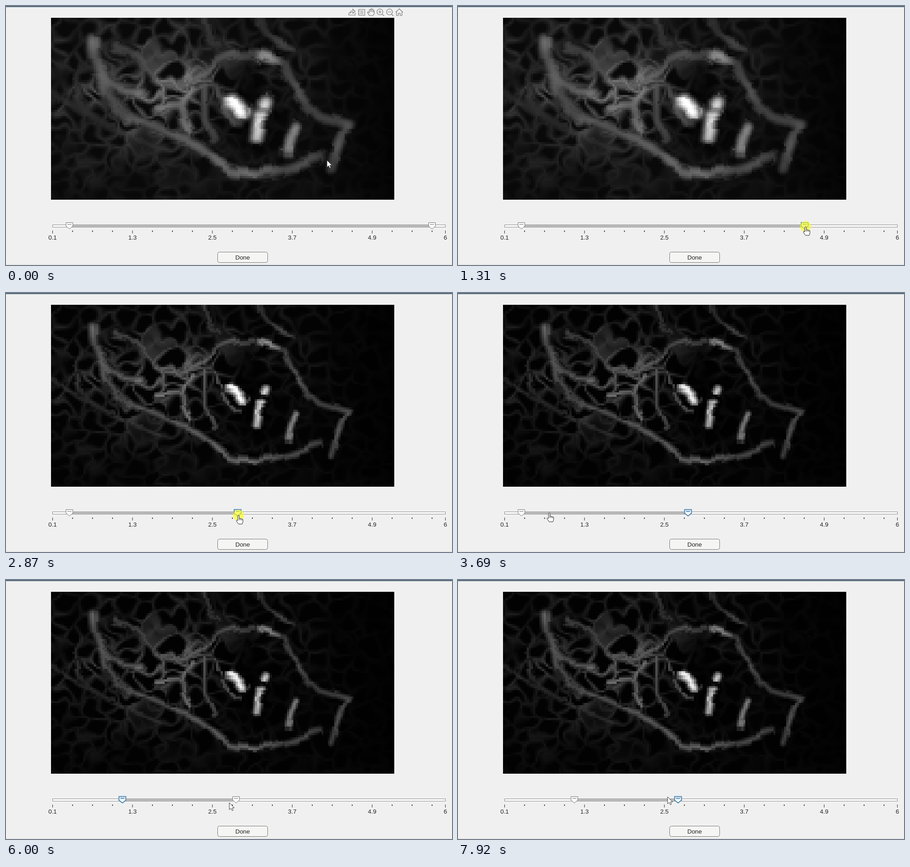
Recreate the animation shown at these times as an HTML page with a canvas. Size 981 by 571 pixels, loop 7990 ms.

```html
<!DOCTYPE html>
<html lang="en">
<head>
<meta charset="utf-8">
<style>
  html, body { margin: 0; width: 100%; height: 100%; overflow: hidden; background: #f0f0f0; }
  canvas { position: absolute; left: 99px; top: 26px; width: 755px; height: 401px; image-rendering: pixelated; }
  svg { position: absolute; left: 0; top: 0; width: 981px; height: 571px; }
  text { font: 13.4px "Liberation Sans", Arial, sans-serif; fill: #222; text-anchor: middle; }
</style>
</head>
<body>
<canvas id="view" width="160" height="85"></canvas>
<svg viewBox="0 0 981 571">
  <rect width="981" height="2.4" fill="#4e6579"/>
  <path d="M0 570.5H981" stroke="#dcdcdc"/>
  <g id="toolbar" fill="none" stroke="#777" stroke-width="1.2">
    <path d="M754 15v5h14v-5M756 16q1-6 7-6v-3l5 5-5 4v-3q-4 0-7 3"/>
    <path d="M776 7.5h13v13h-13zM779 11h7M779 14h7M779 17h7M774 11h3M774 17h3"/>
    <path d="M799 21l-4-7q2-2 4 1v-6q2-2 3 0v4-6q2-2 3 0v6-5q2-2 3 0v6-3q2-2 2 1v5l-3 4z"/>
    <path d="M827 18l5 4M819 13h7M822.5 9.500v7M848 18l4 4M840 13h7"/>
    <circle cx="822.5" cy="13" r="6.5"/><circle cx="843.5" cy="13" r="6.5"/>
    <path d="M857 14l8-8 8 8M859 13v8h4v-5h4v5h4v-8"/>
  </g>
  <rect x="102.5" y="482.5" width="864" height="5" fill="#fff" stroke="#888"/>
  <rect id="range" y="482.5" height="5" fill="#bfbfbf" stroke="#888"/>
  <g id="scale" stroke="#222"></g>
  <g id="labels"></g>
  <rect x="465.5" y="542.5" width="110" height="23" rx="4" fill="#f5f5f3" stroke="#777"/>
  <text x="520.5" y="558.5">Done</text>
  <g id="low"></g>
  <g id="high"></g>
  <circle id="press" r="12" fill="#ffff10" opacity=".62"/>
  <path id="arrow" d="M0 0V15.500L3.600 12.200 6 17.500 8.500 16.400 6.200 11.300H11Z" fill="#fff" stroke="#222" stroke-width=".9"/>
  <path id="hand" d="M-1.600 1Q0-.8 1.600 1V7.200Q3.300 5.800 4.500 7.600 6.500 6.600 7.300 8.600 9.200 8 9.700 10V14.500L8 19.500H0L-5 12.500Q-4.800 10-1.600 12ZM1.600 7v4M4.500 8v3M7.300 9v2.500" fill="#fff" stroke="#222"/>
</svg>
<script>
const $ = id => document.getElementById(id);
const LOOP = 7990, COLS = 160, ROWS = 85, CELL = 4.72;

// Main vessels: [width, grey, path]
const vessels = [
  [22, 115, 'M195 80Q200 165 240 178T300 188'],
  [18, 105, 'M215 160Q225 215 265 240T385 295Q435 305 460 340T585 367L690 335'],
  [15, 100, 'M240 90Q290 100 320 150T435 148Q465 105 540 105'],
  [15, 150, 'M552 106L600 122'],
  [15, 95, 'M608 125Q630 190 690 245L750 262Q730 300 715 360'],
  [13, 60, 'M100 185Q200 265 340 315M162 125Q145 200 180 240'],
  [12, 80, 'M435 27Q440 65 470 92M555 27Q560 75 630 95'],
  [13, 140, 'M412 182Q365 220 403 278M330 226L385 222'],
  [9, 110, 'M437 170V250L458 300M465 175Q480 240 510 260'],
  [16, 160, 'M638 262L620 320'],
  [22, 270, 'M497 210Q512 212 524 234'],
  [20, 240, 'M558 248L551 290M572 212L568 220']
];

// Wide, medium and narrow smoothing range
const looks = [
  { thickness: 1.15, gain: 1, blur: 1, rim: 20, haze: 9 },
  { thickness: .8, gain: .85, blur: .75, rim: 15, haze: 3 },
  { thickness: .75, gain: .8, blur: .7, rim: 14, haze: 2 }
];

const hash = (x, y, seed = 0) => {
  const s = Math.sin(x * 127.1 + y * 311.7 + seed * 74.7) * 43758.5453;
  return s - Math.floor(s);
};
const mix = (a, b, f) => a + (b - a) * f;
const bell = (x, y, cx, cy, rx, ry) => Math.exp(-(((x - cx) / rx) ** 2) - ((y - cy) / ry) ** 2);

function noise(x, y, seed) {
  const ix = Math.floor(x), iy = Math.floor(y);
  const ease = f => f * f * (3 - 2 * f);
  const row = j => mix(hash(ix, j, seed), hash(ix + 1, j, seed), ease(x - ix));
  return mix(row(iy), row(iy + 1), ease(y - iy));
}

// Gap between the two nearest seed points: zero along the walls between cells
function wallDistance(x, y) {
  const ix = Math.floor(x), iy = Math.floor(y);
  let first = 9, second = 9;
  for (let j = iy - 1; j <= iy + 1; j++)
    for (let i = ix - 1; i <= ix + 1; i++) {
      const d = Math.hypot(i + hash(i, j, 1) - x, j + hash(i, j, 2) - y);
      if (d < first) [first, second] = [d, first];
      else if (d < second) second = d;
    }
  return second - first;
}

function drawVessels({ thickness, gain, blur }) {
  const g = new OffscreenCanvas(COLS, ROWS).getContext('2d');
  g.fillRect(0, 0, COLS, ROWS);
  g.scale(1 / CELL, 1 / CELL);
  g.translate(-99, -26);
  g.lineCap = 'round';
  g.filter = `blur(${blur}px)`;
  g.globalCompositeOperation = 'lighten';
  for (const [width, grey, path] of vessels)
    for (const part of [1.4, .85, .4]) {
      const v = grey * gain * (1.25 - part * .6);
      g.lineWidth = width * thickness * part;
      g.strokeStyle = `rgb(${v},${v},${v})`;
      g.stroke(new Path2D(path));
    }
  return g.getImageData(0, 0, COLS, ROWS).data;
}

function renderImage(look) {
  const image = new ImageData(COLS, ROWS);
  const strokes = drawVessels(look);
  for (let row = 0; row < ROWS; row++)
    for (let col = 0; col < COLS; col++) {
      const x = 99 + col * CELL, y = 26 + row * CELL;
      const dx = noise(x / 26, y / 26, 3) - .5, dy = noise(x / 26, y / 26, 4) - .5;
      const patch = noise(x / 38, y / 38, 5);

      const wall = wallDistance((x + dx * 30) / 42, (y + dy * 30) / 38) * 40;
      const rim = Math.max(0, 1 - wall / look.rim);
      const glow = 14 + 80 * bell(x, y, 340, 175, 210, 125);
      const cavity = 1 - .9 * bell(x, y, 535, 240, 75, 95);
      const fade = Math.min(1, Math.max(.25, (900 - x) / 250));
      const network = (rim * glow * (.35 + patch) * look.gain + look.haze) * cavity * fade;

      const sx = Math.round(Math.min(COLS - 1, Math.max(0, col + dx * 2.5)));
      const sy = Math.round(Math.min(ROWS - 1, Math.max(0, row + dy * 2.5)));
      const stroke = strokes[(sy * COLS + sx) * 4] * (.7 + .5 * patch);
      const v = Math.max(stroke, network);
      image.data.set([v, v, v, 255], (row * COLS + col) * 4);
    }
  return image;
}
const images = looks.map(renderImage);
const view = $('view').getContext('2d');

for (let i = 0; i <= 20; i++) {
  const value = i < 20 ? .1 + i * .3 : 6;
  const x = 102.5 + (value - .1) / 5.9 * 864;
  const major = i % 4 == 0;
  $('scale').innerHTML += `<path d="M${x} 495v${major ? 6.5 : 3}" stroke-width="${major ? 1 : 1.6}"/>`;
  if (major) $('labels').innerHTML += `<text x="${x}" y="515">${+value.toFixed(1)}</text>`;
}
for (const id of ['low', 'high'])
  $(id).innerHTML = '<path d="M-7.500 477.500h15v8l-7.500 6-7.500-6z" fill="#fafafa"/><path d="M-4.500 481.500h9"/>';

// Pointer moves; a move may drag a thumb along
const GRAB = 2;
const moves = [
  { from: 190, to: 880, x: 939, y: 484 },
  { from: 1030, to: 1720, x: 618, y: 488, drag: 'high' },
  { from: 2250, to: 2940, x: 508, y: 490, drag: 'high' },
  { from: 3340, to: 3840, x: 141, y: 484 },
  { from: 4080, to: 4570, x: 236, y: 489, drag: 'low' },
  { from: 5040, to: 5500, x: 258, y: 490, drag: 'low' },
  { from: 5850, to: 6024, x: 503, y: 491 },
  { from: 6024, to: 6150, x: 505, y: 505 },
  { from: 6200, to: 6400, x: 508, y: 486 },
  { from: 6740, to: 7150, x: 486, y: 484, drag: 'high' },
  { from: 7220, to: 7500, x: 254, y: 482 },
  { from: 7570, to: 7920, x: 461, y: 478 }
];

function stateAt(t) {
  const s = { x: 706, y: 340, low: 139.5, high: 937, focus: '', pressed: false };
  for (const { from, to, x, y, drag } of moves) {
    if (t < from) break;
    const f = 1 - (1 - Math.min(1, (t - from) / (to - from))) ** 1.5;
    s.x = mix(s.x, x, f);
    s.y = mix(s.y, y, f);
    if (!drag) continue;
    s[drag] = s.x - GRAB;
    s.focus = drag;
    s.pressed = t < to + 60;
  }
  return s;
}

const show = (id, on) => $(id).style.display = on ? '' : 'none';
const place = (id, x, y) => $(id).setAttribute('transform', `translate(${x} ${y})`);

function setThumb(id, x, focused) {
  place(id, x, 0);
  $(id).setAttribute('stroke', focused ? '#4b87b5' : '#777');
  $(id).setAttribute('stroke-width', focused ? 2 : 1);
}

function frame(now) {
  const t = now % LOOP;
  const { x, y, low, high, focus, pressed } = stateAt(t);
  const pointing = (t >= 800 && t < 5850) || (t >= 6400 && t < 7570);

  view.putImageData(images[t < 1850 ? 0 : t < 2940 ? 1 : 2], 0, 0);
  setThumb('low', low, focus == 'low');
  setThumb('high', high, focus == 'high');
  $('range').setAttribute('x', low);
  $('range').setAttribute('width', high - low);
  show('toolbar', t < 500);
  show('press', pressed);
  show('hand', pointing);
  show('arrow', !pointing);
  for (const id of ['press', 'hand', 'arrow']) place(id, x, y);
  requestAnimationFrame(frame);
}
requestAnimationFrame(frame);
</script>
</body>
</html>
```
